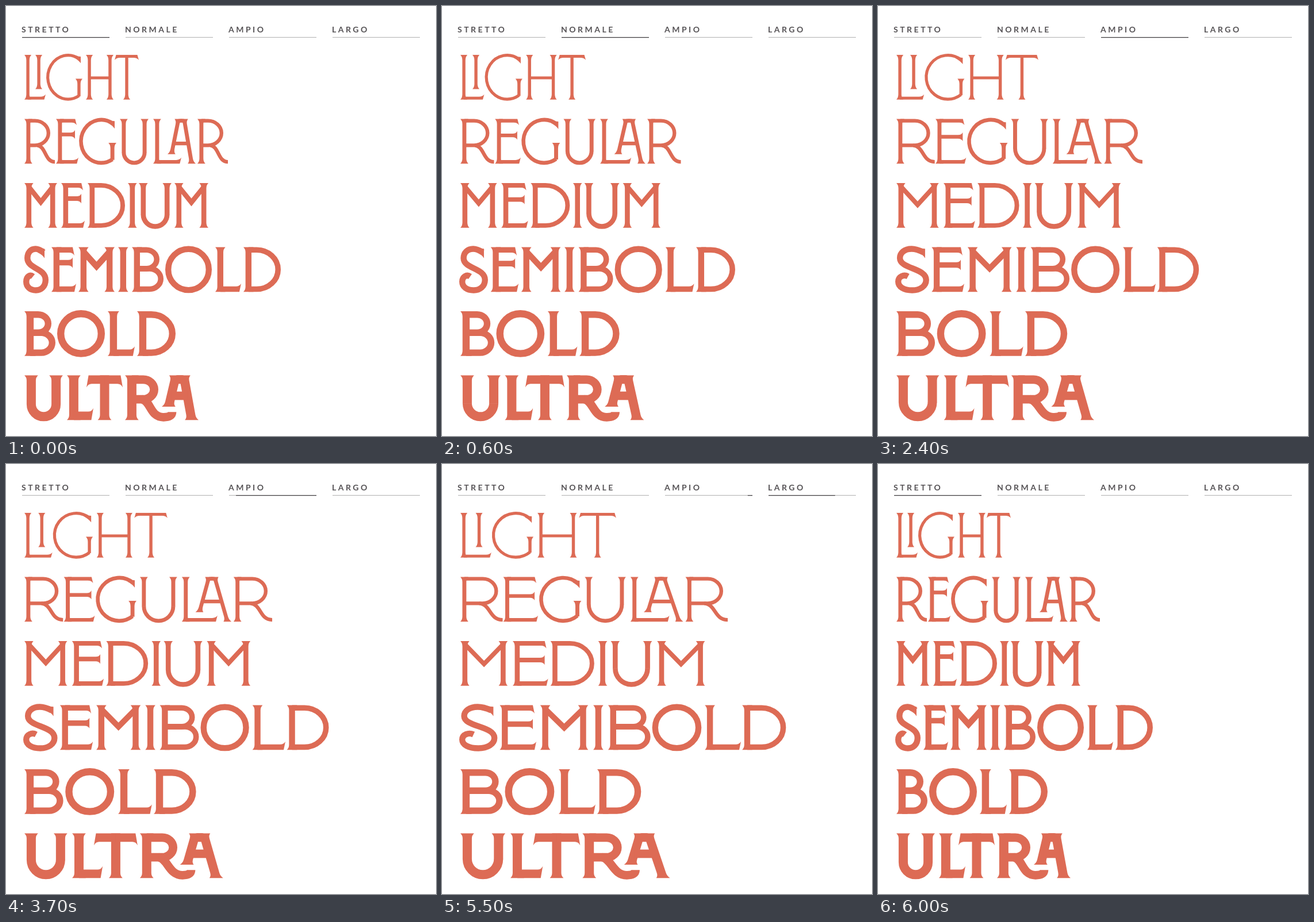
Animation, 748 px wide and 748 px high, one loop 7200 ms. Source, as an HTML page with a canvas:

```html
<!DOCTYPE html>
<html lang="it">
<head>
<meta charset="utf-8">
<title>Width axis specimen</title>
<style>
  html, body { margin: 0; width: 100%; height: 100%; overflow: hidden; background: #fff; }
  canvas { position: absolute; left: 0; top: 0; width: 748px; height: 748px; }
  .label {
    position: absolute; top: 30px; width: 152px; height: 24px;
    border-bottom: 1px solid #b0b0b0; color: #565356;
    font: 700 14px/21px Lato, sans-serif; letter-spacing: 3.5px; text-indent: -1px; white-space: nowrap;
  }
</style>
</head>
<body>
<div class="label" style="left:28px">STRETTO</div>
<div class="label" style="left:208px">NORMALE</div>
<div class="label" style="left:388px">AMPIO</div>
<div class="label" style="left:568px">LARGO</div>
<canvas role="img" aria-label="LIGHT REGULAR MEDIUM SEMIBOLD BOLD ULTRA"></canvas>
<script>
const SIZE = 748, CAP = 77.8, PITCH = 111.5, FIRST_TOP = 85;
const INK = '#dd6b55', DARK = '#454345';
const COLUMN = 180, COLUMN_WIDTH = 152, MARGIN = 28;
const STOPS = [0, 0.248, 0.622, 1];

// Each letter: glyph, then left and right edge when narrow, left and right edge when wide.
// 'i' is the raised I, 'r' the R with a curled leg.
const ROWS = [
  { weight: 5.4, letters: [['L', 32, 69, 32, 87], ['i', 51, 63, 59, 71], ['G', 70, 133, 88, 161],
    ['H', 139, 187, 168, 238], ['T', 189, 231, 242, 308]] },
  { weight: 6.9, letters: [['R', 32, 85, 32, 107], ['E', 87, 126, 108, 170], ['G', 127, 192, 172, 246],
    ['U', 198, 248, 252, 325], ['L', 256, 305, 333, 402], ['A', 281, 330, 356, 426], ['R', 333, 386, 430, 505]] },
  { weight: 8.6, letters: [['M', 32, 89, 32, 116], ['E', 96, 137, 125, 188], ['D', 142, 207, 192, 269],
    ['I', 212, 227, 276, 291], ['U', 231, 288, 298, 371], ['M', 293, 352, 380, 465]] },
  { weight: 10.4, letters: [['S', 30, 74, 30, 98], ['E', 79, 122, 102, 167], ['M', 126, 189, 174, 259],
    ['I', 195, 214, 268, 286], ['B', 219, 274, 294, 369], ['O', 277, 358, 372, 458],
    ['L', 364, 409, 464, 528], ['D', 413, 478, 530, 607]] },
  { weight: 12.4, letters: [['B', 32, 86, 32, 107], ['O', 89, 172, 111, 197],
    ['L', 177, 224, 205, 270], ['D', 228, 295, 273, 350]] },
  { weight: 16, letters: [['U', 32, 99, 32, 111], ['L', 106, 152, 120, 177], ['T', 140, 203, 160, 243],
    ['r', 207, 296, 247, 347], ['A', 271, 335, 320, 401]] }
];

const canvas = document.querySelector('canvas');
const ctx = canvas.getContext('2d');
const ratio = window.devicePixelRatio || 1;
canvas.width = canvas.height = SIZE * ratio;
ctx.scale(ratio, ratio);

const lerp = (a, b, t) => a + (b - a) * t;

function fillPath(build) {
  ctx.beginPath();
  build();
  ctx.closePath();
  ctx.fill();
}

function strokePath(width, build) {
  ctx.lineWidth = width;
  ctx.beginPath();
  build();
  ctx.stroke();
}

// Drawing pen for one letter box; y = 0 is the cap line, y = CAP the baseline.
function makePen(x0, x1, w, t) {
  const serif = 3.1 + 0.05 * w;
  const h = 0.92 * w;
  const left = x0 + serif + w / 2;
  const right = x1 - serif - w / 2;

  // Flared stem between two centre points; either end may stay plain.
  function stem(xa, xb, ya = 0, yb = CAP, flareTop = true, flareBottom = true) {
    const half = w / 2, flare = 9, bend = 3.5;
    const at = y => lerp(xa, xb, (y - ya) / (yb - ya));
    fillPath(() => {
      if (flareTop) {
        ctx.moveTo(xa - half - serif, ya);
        ctx.lineTo(xa + half + serif, ya);
        ctx.quadraticCurveTo(at(ya + bend) + half, ya + bend, at(ya + flare) + half, ya + flare);
      } else {
        ctx.moveTo(xa - half, ya);
        ctx.lineTo(xa + half, ya);
      }
      if (flareBottom) {
        ctx.lineTo(at(yb - flare) + half, yb - flare);
        ctx.quadraticCurveTo(at(yb - bend) + half, yb - bend, xb + half + serif, yb);
        ctx.lineTo(xb - half - serif, yb);
        ctx.quadraticCurveTo(at(yb - bend) - half, yb - bend, at(yb - flare) - half, yb - flare);
      } else {
        ctx.lineTo(xb + half, yb);
        ctx.lineTo(xb - half, yb);
      }
      if (flareTop) {
        ctx.lineTo(at(ya + flare) - half, ya + flare);
        ctx.quadraticCurveTo(at(ya + bend) - half, ya + bend, xa - half - serif, ya);
      }
    });
  }

  // Horizontal arm whose tip points inward (dir 1: down, -1: up).
  function arm(from, to, y, dir) {
    const side = Math.sign(to - from), inner = y + dir * h;
    fillPath(() => {
      ctx.moveTo(from, y);
      ctx.lineTo(to - side * (2 + 0.1 * w), y);
      ctx.lineTo(to, inner + dir * (3 + 0.2 * w));
      ctx.quadraticCurveTo(to - side * 3, inner, to - side * 9, inner);
      ctx.lineTo(from, inner);
    });
  }

  function middleArm(from, to, y) {
    const half = h / 2, tip = half + 4.5;
    fillPath(() => {
      ctx.moveTo(from, y - half);
      ctx.lineTo(to - 8, y - half);
      ctx.quadraticCurveTo(to - 2, y - half, to, y - tip);
      ctx.lineTo(to, y + tip);
      ctx.quadraticCurveTo(to - 2, y + half, to - 8, y + half);
      ctx.lineTo(from, y + half);
    });
  }

  function bar(from, to, y) {
    ctx.fillRect(from, y - h / 2, to - from, h);
  }

  // Bowl given by its outer edges.
  function bowl(edge, ya, yb) {
    const ry = (yb - ya - h) / 2;
    const rx = Math.min(0.66 * (edge - left), ry * 1.1);
    strokePath(h, () => {
      ctx.moveTo(left, ya + h / 2);
      ctx.ellipse(edge - h / 2 - rx, (ya + yb) / 2, rx, ry, 0, -Math.PI / 2, Math.PI / 2);
      ctx.lineTo(left, yb - h / 2);
    });
  }

  function beak(x, y) {
    fillPath(() => {
      ctx.moveTo(x, y - w / 2 - 2);
      ctx.lineTo(x, y + w / 2 + 4);
      ctx.quadraticCurveTo(x - 4, y + w / 4, x - 12, y + w / 2 - 6);
      ctx.lineTo(x - 12, y - w / 2 - 3);
    });
  }

  return { x0, x1, w, h, t, serif, left, right, stem, arm, middleArm, bar, bowl, beak };
}

function drawR(p, edge, leg) {
  const waist = 49;
  p.stem(p.left, p.left);
  p.bowl(edge, 0, waist);
  strokePath(p.h, () => leg(lerp(p.x0, edge, 0.5), waist - p.h / 2));
}

const GLYPHS = {
  I(p) { p.stem(p.left, p.left); },
  i(p) { p.stem(p.left, p.left, 0, 59.5); },
  L(p) {
    p.stem(p.left, p.left);
    p.arm(p.left, p.x1, CAP, -1);
  },
  E(p) {
    p.stem(p.left, p.left);
    p.arm(p.left, p.x1 - 3, 0, 1);
    p.middleArm(p.left, p.x1 - 6, lerp(27, 33.5, p.t));
    p.arm(p.left, p.x1, CAP, -1);
  },
  H(p) {
    p.stem(p.left, p.left);
    p.stem(p.right, p.right);
    p.bar(p.left, p.right, 40);
  },
  T(p) {
    const mid = (p.x0 + p.x1) / 2;
    p.stem(mid, mid, 0, CAP, false);
    p.arm(mid, p.x0, 0, 1);
    p.arm(mid, p.x1, 0, 1);
  },
  D(p) {
    p.stem(p.left, p.left);
    p.bowl(p.x1, 0, CAP);
  },
  B(p) {
    const mid = 0.48 * CAP;
    p.stem(p.left, p.left);
    p.bowl(p.x1 - 7, 0, mid + p.h / 2);
    p.bowl(p.x1, mid - p.h / 2, CAP);
  },
  O(p) {
    strokePath(p.w, () => ctx.ellipse((p.x0 + p.x1) / 2, CAP / 2,
      (p.x1 - p.x0 - p.w) / 2, CAP / 2 + 2 - p.w / 2, 0, 0, 2 * Math.PI));
  },
  U(p) {
    const rx = (p.right - p.left) / 2, bend = CAP + 2 - p.w / 2 - rx;
    p.stem(p.left, p.left, 0, bend + 0.5, true, false);
    p.stem(p.right, p.right, 0, bend + 0.5, true, false);
    strokePath(p.w, () => ctx.ellipse(p.left + rx, bend, rx, rx, 0, Math.PI, 0, true));
  },
  M(p) {
    const mid = (p.x0 + p.x1) / 2;
    const tip = 27.5 + 0.22 * (p.x1 - p.x0);
    const slope = tip * 0.75 / (mid - p.left);
    const thick = p.h * Math.hypot(1, slope);
    p.stem(p.left, p.left);
    p.stem(p.right, p.right);
    fillPath(() => {
      ctx.moveTo(p.left, 0);
      ctx.lineTo(mid, tip - thick);
      ctx.lineTo(p.right, 0);
      ctx.lineTo(p.right, thick);
      ctx.lineTo(mid, tip);
      ctx.lineTo(p.left, thick);
    });
  },
  A(p) {
    const apex = lerp(p.x0, p.x1, lerp(0.49, 0.435, p.t));
    const spread = 6.5 + 0.75 * p.w - p.serif - p.w / 2;
    const foot = 66.5 - 0.75 * p.w;
    const barY = 48 - 0.78 * p.w;
    p.stem(apex - spread, p.left, 0, foot);
    p.stem(apex + spread, p.right);
    p.bar(lerp(apex - spread, p.left, barY / foot), lerp(apex + spread, p.right, barY / CAP), barY);
    ctx.fillRect(apex - spread, 0, 2 * spread, p.h);
  },
  G(p) {
    const rOuter = 15 + 0.365 * (p.x1 - p.x0);
    const cx = p.x0 + rOuter, cy = CAP / 2;
    const rx = rOuter - p.w / 2, ry = cy + 2 - p.w / 2;
    const tipX = p.x1 - 3;
    const open = Math.acos((tipX - 3 - cx) / rx), close = Math.acos((p.right - cx) / rx);
    strokePath(p.w * 0.96, () => ctx.ellipse(cx, cy, rx, ry, 0, -open, close, true));
    p.beak(tipX, cy - ry * Math.sin(open) + 1);
    p.stem(p.right, p.right, cy + 2.5, cy + ry * Math.sin(close) + 1, true, false);
  },
  S(p) {
    const a = p.x0 + p.w / 2, span = p.x1 - p.x0 - p.w;
    const X = u => a + u * span;
    strokePath(p.w, () => {
      ctx.moveTo(X(0.9), 9);
      ctx.bezierCurveTo(X(0.78), 6, X(0.65), 3, X(0.48), 3);
      ctx.bezierCurveTo(X(0.22), 3, X(0.06), 10, X(0.06), 19);
      ctx.bezierCurveTo(X(0.06), 38, X(1), 36, X(1), 57);
      ctx.bezierCurveTo(X(1), 68, X(0.78), 75, X(0.5), 75);
      ctx.bezierCurveTo(X(0.2), 75, X(0), 69, X(0), 60);
      ctx.bezierCurveTo(X(0), 51, X(0.2), 47, X(0.35), 51);
    });
    p.beak(p.x1 - 7, 10);
  },
  R(p) {
    drawR(p, p.x1 - 8, (x, y) => {
      const low = CAP - p.h / 2;
      ctx.moveTo(x, y);
      ctx.bezierCurveTo(lerp(x, p.x1, 0.5), y + 2, lerp(x, p.x1, 0.42), low, p.x1, low);
    });
  },
  r(p) {
    const low = CAP - 5;
    drawR(p, p.x1 - 31, (x, y) => {
      ctx.moveTo(x, y);
      ctx.bezierCurveTo(x + 16, y + 2, p.x1 - 46, low, p.x1 - 22, low);
      ctx.bezierCurveTo(p.x1 - 12, low, p.x1 - 7, low - 3, p.x1 - 7, low - 9);
    });
  }
};

function drawMarker(position) {
  const start = MARGIN + COLUMN * position;
  ctx.fillStyle = DARK;
  for (let i = 0; i < 4; i++) {
    const column = MARGIN + COLUMN * i;
    const from = Math.max(start, column);
    const to = Math.min(start, column) + COLUMN_WIDTH;
    if (to > from) ctx.fillRect(from, 54, to - from, 1.3);
  }
}

function draw(now) {
  const time = now % 7200;
  const stop = Math.floor(time / 1800), next = (stop + 1) % 4;
  const step = Math.min(6, Math.floor((time % 1800) / 100));
  const eased = (1 - Math.cos(Math.PI * step / 6)) / 2;
  const t = lerp(STOPS[stop], STOPS[next], eased);

  ctx.clearRect(0, 0, SIZE, SIZE);
  drawMarker(lerp(stop, next, eased));
  ctx.fillStyle = ctx.strokeStyle = INK;
  ROWS.forEach((row, i) => {
    ctx.save();
    ctx.translate(0, FIRST_TOP + PITCH * i);
    for (const [glyph, n0, n1, w0, w1] of row.letters) {
      GLYPHS[glyph](makePen(lerp(n0, w0, t), lerp(n1, w1, t), row.weight, t));
    }
    ctx.restore();
  });
}

function loop() {
  draw(performance.now());
  requestAnimationFrame(loop);
}
loop();
</script>
</body>
</html>
```
